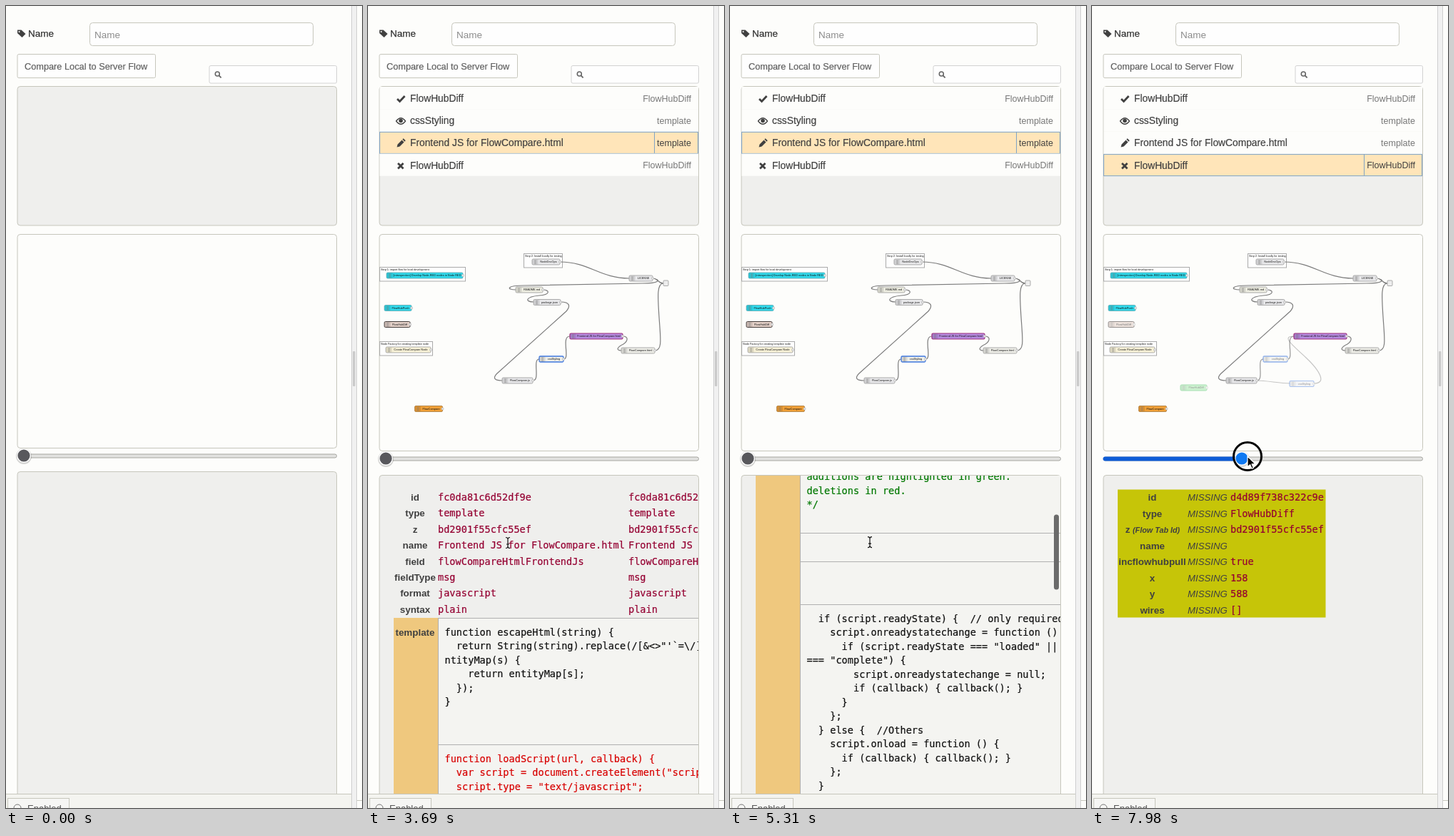
Recreate the animation shown at these times as an HTML page. Size 499 by 1122 pixels, loop 8000 ms.

```html
<!DOCTYPE html>
<html lang="en">
<head>
<meta charset="utf-8">
<title>Flow compare</title>
<style>
html, body { margin: 0; width: 100%; height: 100%; overflow: hidden; background: #fdfdfb; }
svg { display: block; }
text { font-family: "Liberation Sans", Arial, sans-serif; white-space: pre; }
.mono { font-family: "DejaVu Sans Mono", monospace; font-size: 13.6px; stroke-width: .2; }
.wire { fill: none; stroke: #7c7c7c; stroke-width: 1.2; }
</style>
</head>
<body>
<svg id="stage" width="499" height="1122" viewBox="0 0 499 1122"></svg>
<script>
const LINE = '#c6c6bc', PAGE = '#fdfdfb', PANEL = '#efefed', INK = '#404040', VALUE = '#950032', ORANGE = '#efc87e';
const esc = s => s.replace(/&/g, '&amp;').replace(/</g, '&lt;');
const rect = (x, y, w, h, fill, stroke = 'none', r = 0, extra = '') =>
  `<rect x="${x}" y="${y}" width="${w}" height="${h}" rx="${r}" fill="${fill}" stroke="${stroke}" ${extra}/>`;
const text = (x, y, s, size, fill = INK, extra = '') =>
  `<text x="${x}" y="${y}" font-size="${size}" fill="${fill}" ${extra}>${esc(s)}</text>`;
const mono = (x, y, s, fill = VALUE) => `<text class="mono" x="${x}" y="${y}" fill="${fill}" stroke="${fill}">${esc(s)}</text>`;
const path = (d, fill, extra = '') => `<path d="${d}" fill="${fill}" ${extra}/>`;
const group = (id, body, extra = '') => `<g id="${id}" ${extra}>${body}</g>`;
const key = (x, y, s) => text(x, y, s, 13.4, INK, 'font-weight="bold" text-anchor="middle"');
const wire = d => `<path class="wire" d="${d}"/>`;

// Result list
const rows = [
  ['FlowHubDiff', 'FlowHubDiff'], ['cssStyling', 'template'],
  ['Frontend JS for FlowCompare.html', 'template'], ['FlowHubDiff', 'FlowHubDiff']
];
const stroke = w => `stroke="${INK}" stroke-width="${w}"`;
const icons = [
  path('M41 130l3.5 3.5 7-7.5', 'none', stroke(2.8)),
  path('M39.5 161q6.5-8.5 13 0q-6.5 8.5-13 0z', 'none', stroke(1.3)) + `<circle cx="46" cy="160.5" r="2.8" fill="${INK}"/>`,
  path('M40.5 197.5l1-4 6-6 3 3-6 6zM48.3 186.6l1.4-1.3 3 3-1.4 1.4z', INK),
  path('M42 220l7.5 7.5m0-7.5l-7.5 7.5', 'none', stroke(2.8))
];
const listRow = ([name, type], i) => {
  const y = 113.5 + i * 31.2, split = type === 'template' ? 401 : 381;
  return rect(16.5, y - .5, 446.5, 31.2, PAGE, 'none', 0, `id="bg${i}"`) +
    group('sel' + i, rect(16.5, y + .5, 446, 30, '#ffe5b9', '#7fa3c4') + path(`M${split}.5 ${y}v30`, 'none', 'stroke="#7fa3c4"')) +
    icons[i] + text(59, y + 20.5, name, 13.8, INK, `stroke="${INK}" stroke-width=".2"`) +
    text(453, y + 20.2, type, 12.5, '#777', `id="type${i}" text-anchor="end"`);
};

// Flow map
const node = (x, y, w, label, fill, border = '#999', sw = .8) =>
  rect(x, y, w, 8, fill, border, 1.5, `stroke-width="${sw}"`) +
  rect(x + .5, y + .5, 8, 7, '#000', 'none', 1, 'opacity=".1"') +
  path(`M${x + 3} ${y + 2.2}h3m-3 2h3m-3 2h3`, 'none', 'stroke="#777" stroke-width=".6"') +
  rect(x + w - 1.5, y + 2.5, 3, 3, '#e4e4e4', '#aaa', .8, 'stroke-width=".5"') +
  text(x + w / 2 + 3.5, y + 5.2, label, 3.9, '#111', 'text-anchor="middle"');
const box = (x, y, w, label) => rect(x, y, w, 19.5, '#fefefe', '#aaa', 0) + text(x + 1.5, y + 4.3, label, 3.75, '#111');
const PALE = '#e8e8ea', CYAN = '#30d8ea', TEAL = '#5aa5ae';
const map =
  box(218.5, 346.5, 54, 'Step 2: Install locally for testing') +
  box(16.5, 365.5, 120, 'Step 1: import flow for local development') +
  box(16.5, 469.5, 74, 'Node Factory for creating template node') +
  wire('M269 358C310 358 325 381 366 381') +
  wire('M399 381C407 381 406 388 414 388') +
  wire('M399 381C412 383 408 388 385 388L218 391C194 391 194 397 207 397') +
  wire('M245 397C255 397 256 404 240 405C220 407 220 414 232 414') +
  wire('M270 414C283 414 284 420 278 427L181 514C174 521 178 524 188 524') +
  wire('M357 462C366 462 364 469 358 473C346 479 350 482 355 482') +
  wire('M402 482C413 482 410 465 408 435S405 388 414 388') +
  group('oldWires', wire('M231 524C242 524 230 494 240 494') + wire('M274 494C284 494 270 462 283 462')) +
  group('newWires', wire('M231 524C246 524 262 528 277 528') + wire('M311 528C331 528 317 508 300 492S264 462 283 462')) +
  node(230, 354, 39, 'NodeDevOps', PALE) + node(366, 377, 33, 'LICENSE', PALE) +
  rect(414, 384, 7, 7.5, '#eee', '#aaa', 1) +
  node(207, 393, 38, 'README.md', '#eeeee2') + node(232, 410.5, 38, 'package.json', PALE) +
  node(283, 458, 74, 'Frontend JS for FlowCompare.html', '#b58ade', '#a0307c', 1.2) +
  node(355, 478, 47, 'FlowCompare.html', '#eeeee8') + node(188, 520, 43, 'FlowCompare.js', PALE) +
  node(26, 373, 107, '[introspection] Develop Node-RED nodes in Node RED', CYAN, TEAL) +
  node(23, 418.5, 38, 'FlowHubPush', CYAN, TEAL) + node(25, 477, 63, 'Create FlowCompare Node', '#f8f2d8') +
  node(65.5, 559.5, 39, 'FlowCompare', '#f0a038', '#a8793a') +
  group('oldNodes', node(240, 490, 34, 'cssStyling', '#eeeee8', '#3f78e0', 1.3) + node(23, 441.5, 36, 'FlowHubDiff', '#e3d0c8', '#443c3a', 1)) +
  group('newNodes', node(277, 524.5, 34, 'cssStyling', '#e4e6ee', '#3f78e0', 1.2) + node(124, 530, 37, 'FlowHubDiff', '#8fe39a', '#35ba50', 1));

// Detail pages
const rowY = i => 692 + i * 22.4;
const fields = (list, x2) => list.map(([k, v], i) =>
  key(66, rowY(i), k) + mono(98, rowY(i), v) + (x2 ? mono(x2, rowY(i), v) : '')).join('');
const cell = (y, h, s = '', fill) => rect(98.5, y + .5, 420, h, '#f9f9f6', '#adadad') + mono(107.5, y + 24, s, fill);
const shared = [['type', 'template'], ['z', 'bd2901f55cfc55ef']];

const cssPage = fields([['id', '85d2a9034369e7aa'], ...shared, ['name', 'cssStyling'], ['field', 'cssStyling'],
    ['fieldType', 'msg'], ['format', 'css'], ['syntax', 'plain'],
    ['template', '.flow-description-text { font-family: monospace; }'], ['output', 'str']]) +
  rect(36, 901.5, 470, 162, ORANGE) +
  cell(902, 39, '981', '#d00c0c') + cell(942, 39, '1119', '#00783c') +
  cell(984, 39, '776', '#d00c0c') + cell(1023, 39, '906', '#00783c') +
  key(66, 926, 'x') + key(66, 1008, 'y') + key(66, 1080, 'wires') + mono(98, 1080, 'fc0da81c6d52df9e');

const block = (y, h, fill, code = '') => rect(98.5, y + .5, 420, h, '#f4f4f1', '#b0b0b0') +
  code.split('\n').map((s, i) => mono(107.5, y + 24.7 + i * 19.5, s, fill)).join('');
const jsPage = fields([['id', 'fc0da81c6d52df9e'], ...shared, ['name', 'Frontend JS for FlowCompare.html'],
    ['field', 'flowCompareHtmlFrontendJs'], ['fieldType', 'msg'], ['format', 'javascript'], ['syntax', 'plain']], 365) +
  rect(36, 856, 62.5, 900, ORANGE) + key(66, 881, 'template') +
  block(856, 177, '#111', `function escapeHtml(string) {
  return String(string).replace(/[&<>"'\`=\\/]/g, function
ntityMap(s) {
    return entityMap[s];
  });
}`) +
  block(1033, 99, '#d80000', `function loadScript(url, callback) {
  var script = document.createElement("script");
  script.type = "text/javascript";`) +
  block(1132, 118, '#007800', `/*
additions are highlighted in green.
deletions in red.
*/`) +
  block(1250, 40) + block(1290, 60) +
  block(1350, 400, '#111', `  if (script.readyState) {  // only required for
    script.onreadystatechange = function () {
      if (script.readyState === "loaded" ||
=== "complete") {
        script.onreadystatechange = null;
        if (callback) { callback(); }
      }
    };
  } else {  //Others
    script.onload = function () {
      if (callback) { callback(); }
    };
  }`);

const missing = [['id', 'd4d89f738c322c9e'], ['type', 'FlowHubDiff'], ['', 'bd2901f55cfc55ef'], ['name', ''],
  ['incflowhubpull', 'true'], ['x', '158'], ['y', '588'], ['wires', '[]']];
const missingPage = rect(36, 676.5, 291.5, 179, '#c6c508') + missing.map(([k, v], i) => {
  const y = rowY(i) + i * .1;
  return key(84.5, y, k) + text(134, y, 'MISSING', 13.2, INK, 'font-style="italic"') + mono(194, y, v);
}).join('') + key(50, 737, 'z') + text(57, 736.5, '(Flow Tab Id)', 10.8, INK, 'font-weight="bold" font-style="italic"');

const outline = 'stroke="#fff" stroke-width="1.2" stroke-linejoin="round"';
const cursors =
  group('arrow', path('M0 0v15l3.6-3.3 2.5 5.5 2.3-1-2.4-5.4h5z', '#000', outline)) +
  group('hand', path('M-1.5 1Q0-1 1.5 1V6Q3 5 4 6.2Q5.5 5.4 6.5 6.8Q8.5 6.2 9 8.5V12L7.5 16H0L-5 10Q-5.5 7.5-3.3 8L-1.5 9.5z', '#fff', 'stroke="#000" stroke-width="1.3" stroke-linejoin="round"')) +
  group('beam', path('M-3-7.5Q0-7.5 0-5Q0-7.5 3-7.5M0-5V5M-3 7.5Q0 7.5 0 5Q0 7.5 3 7.5M-2 2h4', 'none', 'stroke="#111" stroke-width="1.2"'));

stage.innerHTML =
  '<clipPath id="clip"><rect x="17" y="657" width="446" height="450"/></clipPath>' +
  rect(0, 0, 499, 1122, PAGE) +
  path('M16 33.5h5.5l6 5.5-5 5-6.5-6z', INK) + `<circle cx="18.5" cy="36" r="1.1" fill="${PAGE}"/>` +
  text(31, 43, 'Name', 13.5, '#333', 'stroke="#333" stroke-width=".25"') +
  rect(117.5, 23.5, 313, 32, '#fefefe', LINE, 4) + text(124, 45, 'Name', 13.5, '#8c8c8c') +
  rect(14.5, 66.5, 196, 35, 'none', '#a9bcd4', 3, 'id="focus" stroke-width="2"') +
  rect(16, 67.5, 193.5, 33, '#fefefe', LINE, 2) +
  text(26, 89, 'Compare Local to Server Flow', 12.75, '#606060', 'stroke="#606060" stroke-width=".2"') +
  rect(285, 83.5, 178.5, 24.5, '#fefefe', '#d2d2d2', 2) +
  '<circle cx="296.3" cy="95" r="3" fill="none" stroke="#666" stroke-width="1.6"/>' +
  path('M298.6 97.3l3 3', 'none', 'stroke="#666" stroke-width="1.8"') +
  rect(16, 112.5, 447.5, 194.5, PANEL, LINE, 4) + group('list', rows.map(listRow).join('')) +
  rect(16, 319.5, 447.5, 303, PAGE, LINE, 4, 'id="mapBox"') + group('map', map) +
  group('slider',
    rect(16, 631, 447.5, 5, '#e2e2e0', '#a5a5a0', 2.5) + rect(15.5, 630.5, 0, 6, '#0d5cd6', 'none', 3, 'id="fill"') +
    '<circle class="knob" cx="25" cy="634" r="11" fill="#000" opacity=".16"/>' +
    '<circle class="knob" cx="25" cy="633" r="10" fill="#fff"/><circle class="knob" id="knob" cx="25" cy="633" r="8.6"/>') +
  group('panel', rect(16, 656.5, 447.5, 480, PANEL, LINE, 4)) +
  `<g clip-path="url(#clip)">${group('page1', cssPage)}${group('page2', jsPage)}${group('page3', missingPage)}</g>` +
  rect(454, 656, 7, 105, '#6b6b6b', 'none', 3.5, 'id="innerBar"') +
  rect(0, 1102, 484, 22, '#f4f4f0') + path('M0 1102.5h484', 'none', `stroke="${LINE}"`) +
  rect(2.5, 1108.5, 86, 30, '#f6f6f4', LINE) +
  '<circle cx="16" cy="1122" r="5" fill="none" stroke="#777"/>' + text(30, 1127, 'Enabled', 13, '#555') +
  rect(484.5, -1, 7, 1130, '#f1f1f1', '#cfcfcf') + rect(486, 483, 3.5, 49, '#cbcbcb', 'none', 1) +
  path('M492 1111.5h7', 'none', `stroke="${LINE}"`) +
  rect(474.5, 14, 7, 670, '#757575', 'none', 3.5, 'id="outerBar"') +
  group('cursor', '<circle id="ring" r="19.5" fill="none" stroke="#000" stroke-width="3"/>' + cursors);

const $ = id => document.getElementById(id);
const show = (id, on) => $(id).setAttribute('opacity', +on);
const clamp = v => Math.max(0, Math.min(1, v));
const smooth = u => u * u * (3 - 2 * u);
const easeOut = u => 1 - (1 - u) ** 2;

// Each key is [time, ...values]
function along(keys, t, ease) {
  let i = 0;
  while (i < keys.length - 2 && t >= keys[i + 1][0]) i++;
  const a = keys[i], b = keys[i + 1], u = ease(clamp((t - a[0]) / (b[0] - a[0])));
  return a.slice(1).map((v, j) => v + (b[j + 1] - v) * u);
}
const moves = [[200, 300, 1135], [780, 112, 88], [1000, 112, 88], [1280, 110, 117], [1420, 110, 117], [1800, 202, 151],
  [2420, 202, 151], [2780, 190, 188], [3100, 190, 188], [3580, 196, 751], [5800, 196, 750], [6250, 200, 219],
  [6550, 200, 219], [7150, 32, 630], [7320, 32, 630], [7980, 218, 630]];
const scrolls = [[4080, 0], [4530, 386], [5500, 518]];
const presses = [[840, 960], [1860, 1980], [2900, 3020], [6360, 6480], [7230, 8000]];
const opens = [1950, 3000, 6450], RESULTS = 930;

function draw(t) {
  const ready = t >= RESULTS, page = opens.filter(o => t >= o).length;
  const [x, y] = along(moves, t, smooth);
  const hover = ready && y > 113 && y < 238 ? Math.floor((y - 113) / 31.2) : -1;

  show('list', ready);
  show('map', ready);
  show('focus', t >= 840 && t < 1860);
  rows.forEach((_, i) => {
    const on = page > 0 && i === page;
    show('sel' + i, on);
    $('bg' + i).setAttribute('fill', i === hover ? '#dcdcdc' : PAGE);
    $('type' + i).setAttribute('fill', on || i === hover ? INK : '#777');
  });
  $('mapBox').setAttribute('height', ready ? 303 : 299);
  $('slider').setAttribute('transform', `translate(0 ${ready ? 0 : -4})`);
  $('panel').setAttribute('transform', `translate(0 ${ready ? 0 : -5})`);

  const [scroll] = along(scrolls, t, easeOut);
  for (let i = 1; i < 4; i++) show('page' + i, page === i);
  $('page2').setAttribute('transform', `translate(0 ${-scroll})`);
  $('innerBar').setAttribute('y', 657 + scroll * .106);
  show('innerBar', t >= 4080 && t < 6100);
  $('outerBar').setAttribute('opacity', ready ? clamp((2800 - t) / 250) : 0);

  const drag = t >= 7230, knobX = drag ? x - 8 : 25, mix = clamp((knobX - 25) / 429);
  document.querySelectorAll('.knob').forEach(k => k.setAttribute('cx', Math.max(25, knobX)));
  $('knob').setAttribute('fill', drag ? '#0f79f2' : '#58585c');
  $('fill').setAttribute('width', drag ? Math.max(9, knobX - 16) : 0);
  show('oldNodes', 1 - mix);
  show('oldWires', 1 - mix / 2);
  show('newNodes', mix);
  show('newWires', mix);

  const overButton = y > 68 && y < 100 && x < 209;
  const kind = hover >= 0 || overButton ? 'hand' : page === 2 && y > 656 && t < 5700 ? 'beam' : 'arrow';
  for (const c of ['arrow', 'hand', 'beam']) show(c, c === kind);
  show('ring', presses.some(([a, b]) => t >= a && t < b));
  show('cursor', t >= 200);
  $('cursor').setAttribute('transform', `translate(${x} ${y})`);
}
function frame(now) {
  draw(now % 8000);
  requestAnimationFrame(frame);
}
draw(0);
requestAnimationFrame(frame);
</script>
</body>
</html>
```
